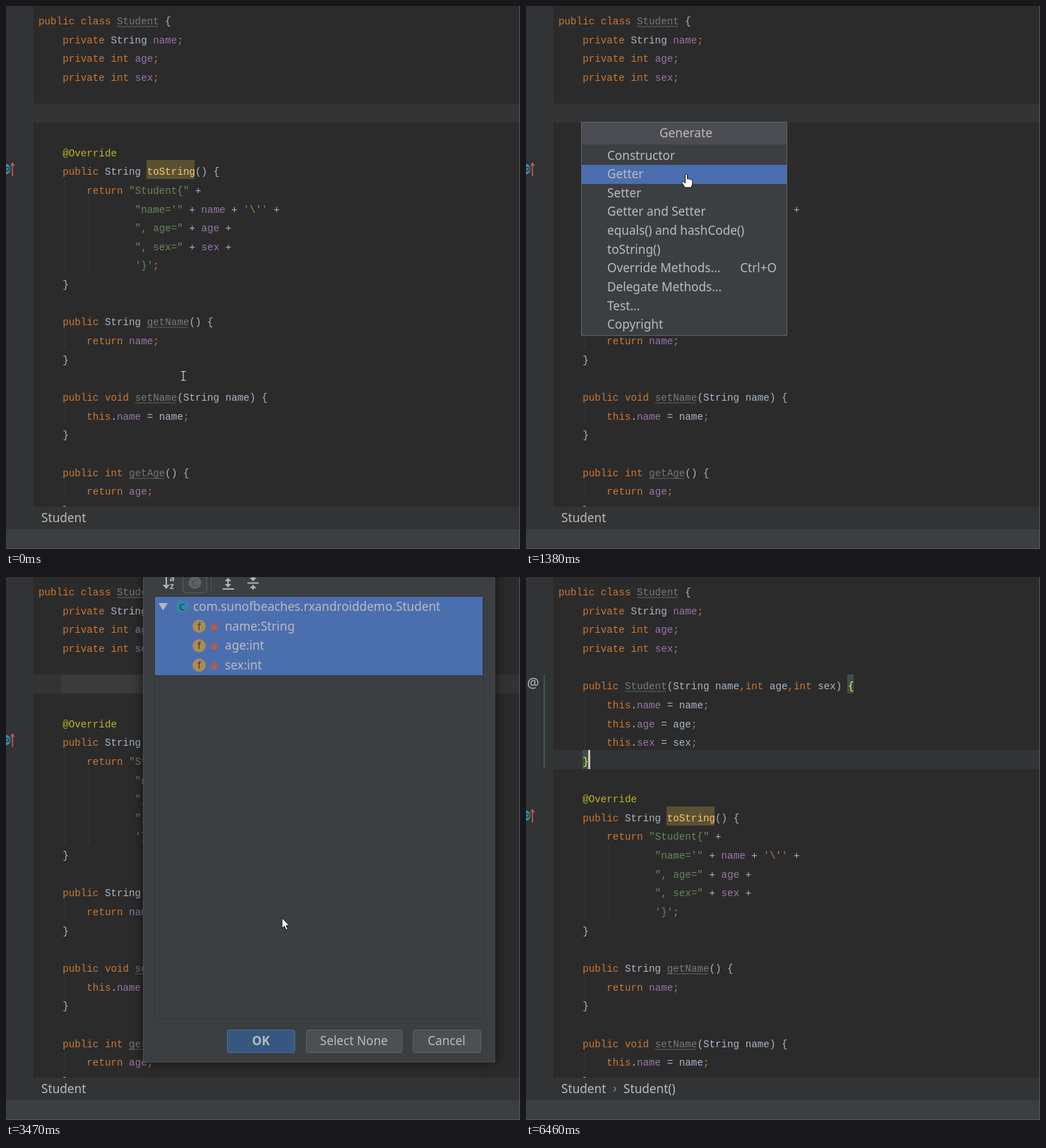
These frames come from a looping animation (728x769 px, 6.73 s). An HTML page with a canvas:

```html
<!DOCTYPE html>
<html lang="en">
<head>
<meta charset="utf-8">
<title>Generate a constructor</title>
<style>
html, body { margin: 0; width: 100%; height: 100%; overflow: hidden; background: #2b2b2b; }
canvas { display: block; }
</style>
</head>
<body>
<canvas id="stage" width="728" height="769"></canvas>
<script>
const ctx = document.getElementById('stage').getContext('2d');
const LOOP = 6730, ROW = 26.65, BAND = 27, COL = 8.54, LEFT = 46;
const MONO = '14.23px "Liberation Mono", monospace';
const UI = '17.2px "Noto Sans", "Open Sans", sans-serif';
const COLORS = { str: '#6a8759', kw: '#cc7832', ann: '#bbb529', dim: '#77797c',
  field: '#9876aa', fn: '#ffc66d', plain: '#a9b7c6' };

// Markers: ~unused name, $field, !highlighted method.
const HEAD = `public class ~Student {
    private String $name;
    private int $age;
    private int $sex;
`.split('\n');
const CONSTRUCTOR = `    public ~Student(String name,int age,int sex) {
        this.$name = name;
        this.$age = age;
        this.$sex = sex;
    }
`.split('\n');
const METHODS = String.raw`    @Override
    public String !toString() {
        return "Student{" +
                "name='" + $name + '\'' +
                ", age=" + $age +
                ", sex=" + $sex +
                '}';
    }

    public String ~getName() {
        return $name;
    }

    public void ~setName(String name) {
        this.$name = name;
    }

    public int ~getAge() {
        return $age;
    }`.split('\n');
const BEFORE = [...HEAD, '', '', ...METHODS];
const AFTER = [...HEAD, ...CONSTRUCTOR, ...METHODS];
const TOKEN = /(?<str>"[^"]*"|'}'|')|(?<kw>\\'|[;,]|\b(?:public|class|private|int|return|void|this)\b)|(?<ann>@\w+)|~(?<dim>\w+)|\$(?<field>\w+)|!(?<fn>\w+)|(?<plain>\w+|.)/g;

const MENU = ['Constructor', 'Getter', 'Setter', 'Getter and Setter', 'equals() and hashCode()',
  'toString()', 'Override Methods...', 'Delegate Methods...', 'Test...', 'Copyright'];

// Pointer steps: time, shape, hot spot.
const POINTER = [
  [0, 'beam', 251, 517], [150, 'beam', 247, 512], [290, 'hand', 236, 460], [410, 'hand', 231, 428],
  [560, 'hand', 229, 355], [680, 'hand', 230, 333], [810, 'hand', 231, 317], [960, 'hand', 231, 305],
  [1110, 'hand', 230, 281], [1230, 'hand', 229, 260], [1380, 'hand', 227, 238], [1530, 'hand', 227, 224],
  [1660, 'hand', 228, 222], [1960, 'hand', 227, 217], [2100, 'arrow', 227, 222], [2340, 'arrow', 290, 272],
  [2460, 'arrow', 352, 325], [2620, 'arrow', 374, 391], [2770, 'arrow', 374, 408], [2890, 'arrow', 374, 421],
  [3320, 'arrow', 383, 441], [3470, 'arrow', 391, 483], [3590, 'arrow', 389, 522], [3720, 'arrow', 376, 562],
  [3870, 'arrow', 374, 604], [4020, 'arrow', 372, 622], [4150, 'arrow', 368, 643], [4420, 'beam', 370, 643],
  [5460, 'beam', 400, 660], [5580, 'beam', 480, 688], [5700, 'arrow', 590, 715], [5820, 'arrow', 674, 745],
  [5940, 'none', 0, 0]];

// Rows and baselines sit on whole pixels.
const rowTop = row => Math.round(5 + ROW * row);
const baselineOf = row => Math.round(26 + ROW * row);

function rect(x, y, w, h, color) {
  ctx.fillStyle = color;
  ctx.fillRect(x, y, w, h);
}

function box(x, y, w, h, radius, fill, stroke, width = 1) {
  ctx.beginPath();
  ctx.roundRect(x, y, w, h, radius);
  ctx.fillStyle = fill;
  ctx.fill();
  ctx.strokeStyle = stroke;
  ctx.lineWidth = width;
  ctx.stroke();
}

function disc(x, y, r, color) {
  ctx.beginPath();
  ctx.arc(x, y, r, 0, 7);
  ctx.fillStyle = color;
  ctx.fill();
}

function polygon(points, color) {
  ctx.beginPath();
  for (const [x, y] of points) ctx.lineTo(x, y);
  ctx.closePath();
  ctx.fillStyle = color;
  ctx.fill();
}

function text(string, x, y, color = '#bbbbbb', font = UI, align = 'left') {
  ctx.font = font;
  ctx.textAlign = align;
  ctx.fillStyle = color;
  ctx.fillText(string, x, y);
}

function wave(x, y, width) {
  ctx.beginPath();
  for (let i = 0; i <= width; i += 2) ctx.lineTo(x + i, y + (i % 4 ? 2 : 0));
  ctx.strokeStyle = '#66686a';
  ctx.lineWidth = 1;
  ctx.stroke();
}

function codeLine(line, row) {
  const baseline = baselineOf(row);
  const indent = line.search(/\S/);
  for (let level = 1; level <= Math.min(2, indent / 4 - 1); level++)
    rect(Math.round(LEFT + level * 34.5) + 2, rowTop(row), 1, BAND, '#383838');
  let x = LEFT;
  for (const { groups } of line.matchAll(TOKEN)) {
    const [kind, word] = Object.entries(groups).find(([, value]) => value !== undefined);
    const width = word.length * COL;
    if (kind === 'fn') rect(Math.floor(x), rowTop(row), Math.round(width), BAND, '#5a5133');
    text(word, x, baseline, COLORS[kind], MONO);
    if (kind === 'dim') wave(x, baseline + 2, width);
    x += width;
  }
}

function overrideIcon(y) {
  disc(-1, y, 7.5, '#3c8dad');
  ctx.beginPath();
  ctx.arc(2, y, 2.5, 0, 7);
  ctx.strokeStyle = '#283b44';
  ctx.lineWidth = 1.5;
  ctx.stroke();
  rect(8.3, y - 8, 1.8, 18, '#c75450');
  polygon([[9.2, y - 10], [13, y - 4], [9.2, y - 6], [5.5, y - 4]], '#c75450');
}

function brace(char, x, row) {
  rect(Math.floor(x), rowTop(row), 9, BAND, '#3b514d');
  text(char, x, baselineOf(row), '#ffef28', MONO);
}

function editor(t) {
  const generated = t >= 4420, settled = t >= 4830, marked = t >= 4970;
  const lines = generated ? AFTER : BEFORE;
  const caretRow = settled ? 9 : 5;
  rect(0, 0, 728, 769, '#2b2b2b');
  rect(0, 0, 39, 769, '#313335');
  rect(39, rowTop(caretRow), 689, BAND, '#323334');
  if (!generated) rect(45, rowTop(5), 1, BAND, '#3a3b3c');
  if (t >= 2100 && !generated) rect(78, rowTop(5), 117, BAND, '#393b3c');
  lines.forEach(codeLine);
  overrideIcon(231 + (generated ? Math.round(4 * ROW) : 0));
  if (settled) text('@', 10, 157, '#b8babc', '19px "Noto Sans", sans-serif', 'center');
  if (marked) {
    rect(25, rowTop(5), 1.5, ROW * 5, '#426350');
    brace('{', LEFT + 48 * COL, 5);
    brace('}', LEFT + 4 * COL, 9);
  }
  const caretOn = settled && !(t >= 4970 && t < 5460) && !(t >= 5940 && t < 6460);
  if (caretOn) rect(88, rowTop(9), 3, BAND, '#c8c8c8');

  rect(0, 709, 728, 32, '#313335');
  rect(0, 741, 728, 28, '#3c3f41');
  text('Student', 50, 731);
  if (settled) {
    text('›', 126, 730, '#8a8c8e', UI, 'center');
    text('Student()', 138, 731);
  }
  rect(727, 0, 1, 769, '#55585a');
  rect(0, 768, 728, 1, '#55585a');
}

function menu(pointer) {
  const hovered = pointer[1] === 'hand' ? Math.floor((pointer[3] - 198) / ROW) : 0;
  box(78.5, 164.5, 291, 302, 0, '#3c3f41', '#616365');
  rect(79, 165, 290, 31, '#4b4d52');
  text('Generate', 226.5, 186, '#bbbbbb', UI, 'center');
  rect(79, Math.round(198 + ROW * hovered), 290, BAND, '#4b6eaf');
  const baseline = i => Math.floor(218 + ROW * i);
  MENU.forEach((label, i) => text(label, 115, baseline(i)));
  text('Ctrl+O', 355, baseline(6), '#bbbbbb', UI, 'right');
}

function toolbar() {
  const ink = '#afb1b3';
  rect(226, -4, 2, 17, ink);
  polygon([[222, 11], [232, 11], [227, 17]], ink);
  text('a', 235, 6, ink, 'bold 12px "Open Sans", sans-serif', 'center');
  text('z', 235, 17, ink, 'bold 12px "Open Sans", sans-serif', 'center');
  box(250.5, -12, 34, 34.5, 4, '#3f4244', '#5c5f61');
  disc(267.5, 8, 9, '#5f6163');
  text('C', 267.5, 13, '#404345', '13px "Open Sans", sans-serif', 'center');
  rect(290, 0, 1, 20, '#55585a');
  rect(307, -2, 16, 2, ink);
  rect(307, 16, 16, 2, ink);
  polygon([[314.5, 1], [319, 6], [310, 6]], ink);
  polygon([[314.5, 15], [319, 10], [310, 10]], ink);
  rect(313.5, 4, 2, 8, ink);
  rect(342, 7.5, 16, 2, ink);
  polygon([[350, 6], [355, 1], [345, 1]], ink);
  polygon([[350, 11], [355, 16], [345, 16]], ink);
  rect(349, -2, 2, 5, ink);
  rect(349, 14, 2, 4, ink);
}

function fieldRow(label, y) {
  disc(273.5, y, 9.3, '#ab8b55');
  text('f', 273.5, y + 5, '#38342c', '14px "Open Sans", sans-serif', 'center');
  rect(291, y - 1, 8, 6.5, '#c4593a');
  ctx.beginPath();
  ctx.arc(295, y - 1.5, 2.5, Math.PI, 0);
  ctx.strokeStyle = '#c4593a';
  ctx.lineWidth = 1.4;
  ctx.stroke();
  text(label, 310, Math.round(y + 6));
}

function button(label, x, width) {
  box(x + .5, 641.5, width, 32, 3, '#4c5052', '#5e6162');
  text(label, x + width / 2, 663, '#bbbbbb', UI, 'center');
}

function dialogBody(t) {
  const pressed = t >= 4420;
  ctx.save();
  ctx.shadowColor = 'rgba(0,0,0,.6)';
  ctx.shadowBlur = pressed ? 8 : 16;
  rect(194, -40, 498.5, 727, '#3c3f41');
  ctx.restore();
  ctx.strokeStyle = '#4a4d4f';
  ctx.lineWidth = 1;
  ctx.strokeRect(194.5, -40, 497.5, 727);
  ctx.strokeStyle = '#35383a';
  ctx.strokeRect(210.5, 27.5, 465, 598);
  if (t < 3470) rect(211, 56, 464, 27.5, '#4b6eaf');
  else rect(211, 28, 464, 111, pressed ? '#0d293e' : '#4b6eaf');
  toolbar();
  polygon([[216, 37], [229, 37], [222.5, 47.5]], '#b5b7b9');
  disc(249.5, 42, 9.3, '#3585a8');
  text('C', 249.5, 47, '#20333d', '13.5px "Open Sans", sans-serif', 'center');
  text('com.sunofbeaches.rxandroiddemo.Student', 265, 48);
  ['name:String', 'age:int', 'sex:int'].forEach((label, i) => fieldRow(label, 69.7 + 27.6 * i));
  if (pressed) box(311.5, 639.5, 99, 35, 5, '#365880', '#466d94', 3);
  else box(313.5, 641.5, 95.5, 32, 3, '#365880', '#4c708c');
  text('OK', 361, 663, '#bbbbbb', 'bold ' + UI, 'center');
  button('Select None', 425, 135.5);
  button('Cancel', 576, 96);
}

// The window fades and scales a little as it opens and closes.
function dialog(t) {
  const opening = t < 2220, closing = t >= 4570;
  const scale = opening ? .981 : closing ? .95 : 1;
  ctx.save();
  ctx.globalAlpha = opening ? .76 : closing ? .35 : 1;
  ctx.translate(436, 298);
  ctx.scale(scale, scale);
  ctx.translate(-436, -298);
  dialogBody(t);
  ctx.restore();
}

const SHAPES = {
  arrow: new Path2D('M0 0V14.5L3.4 11.4L5.8 17L8.2 16L5.8 10.6H10.2Z'),
  hand: new Path2D('M-1.5 1Q0 -1 1.5 1V7Q3 5.5 4 7.3Q5.5 6.3 6.5 8Q8.5 7.3 8.8 9.5V14L7 19H-2L-6 12.5Q-6.5 10 -4 10.5L-1.5 13Z')
};

function drawPointer([, shape, x, y]) {
  if (shape === 'none') return;
  if (shape === 'beam') {
    const ink = '#c4c4c4';
    rect(x - .5, y + 1, 1.3, 12, ink);
    rect(x - 3, y, 6.5, 1.2, ink);
    rect(x - 3, y + 12.5, 6.5, 1.2, ink);
    return;
  }
  ctx.save();
  ctx.translate(x, y);
  ctx.fillStyle = '#ffffff';
  ctx.strokeStyle = '#161616';
  ctx.lineWidth = 1;
  ctx.fill(SHAPES[shape]);
  ctx.stroke(SHAPES[shape]);
  ctx.restore();
}

function draw() {
  const t = performance.now() % LOOP;
  const pointer = POINTER.findLast(step => step[0] <= t);
  editor(t);
  if (t >= 150 && t < 2100) menu(pointer);
  if (t >= 2100 && t < 4700) dialog(t);
  drawPointer(pointer);
  requestAnimationFrame(draw);
}
draw();
</script>
</body>
</html>
```
